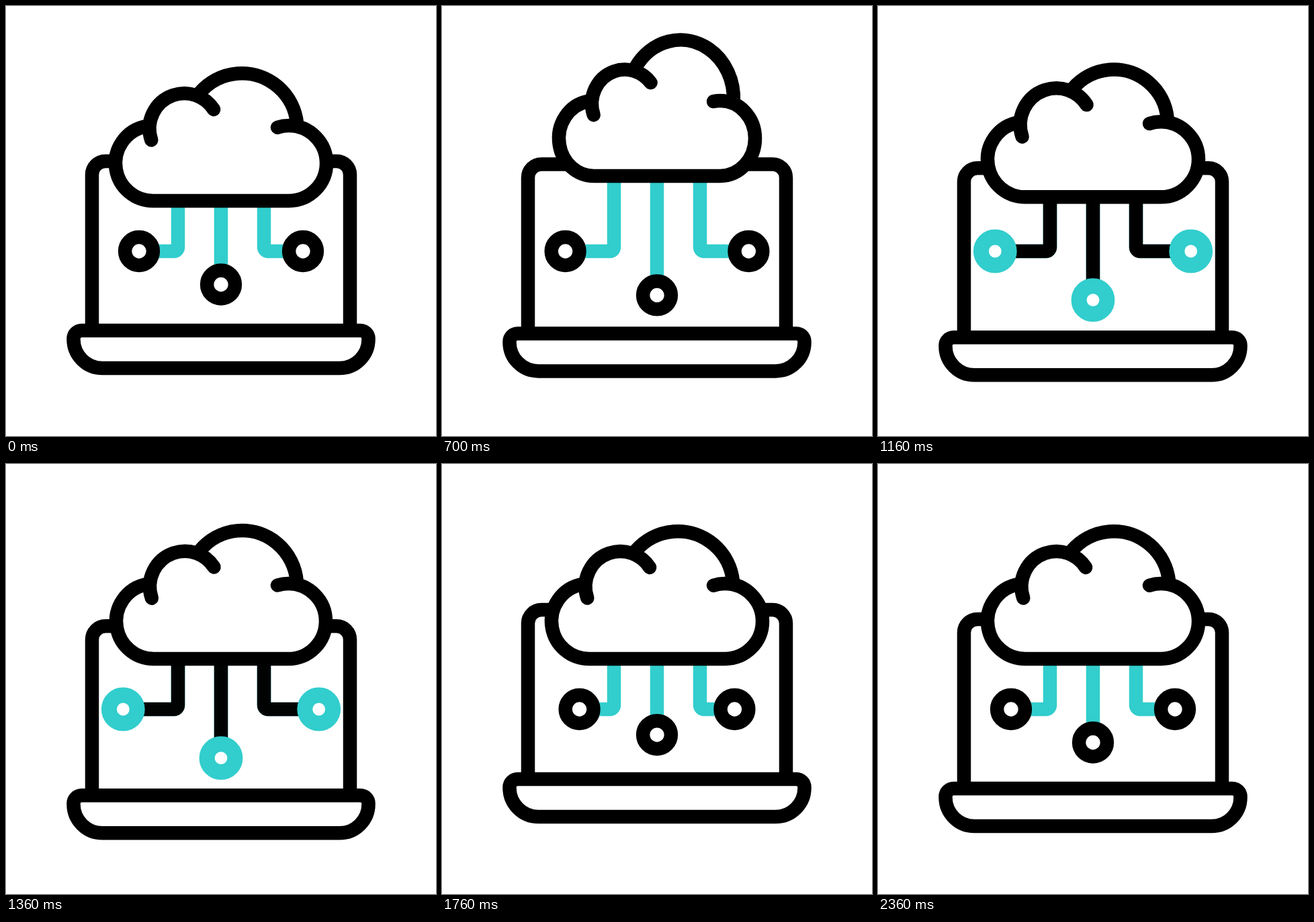
An HTML page with a canvas for the animation above (2.38 s loop, 640 px wide and 640 px high).

```html
<!DOCTYPE html>
<html lang="en">
<head>
<meta charset="utf-8">
<title>Cloud laptop</title>
<style>
  html, body { margin: 0; width: 100%; height: 100%; overflow: hidden; background: #fff; }
  canvas { display: block; width: 640px; height: 640px; }
</style>
</head>
<body>
<canvas id="stage" width="640" height="640"></canvas>
<script>
const ctx = document.getElementById('stage').getContext('2d');
const LOOP = 2380, LINE = 20.5, INK = '#000', TEAL = '#32cdcd';
const RAD = Math.PI / 180, TURN = 2 * Math.PI;

function ease(t, from, to) {
  const u = Math.min(1, Math.max(0, (t - from) / (to - from)));
  return u * u * (3 - 2 * u);
}

// Starts at a value, then eases to each [from, to, value] in turn.
const motion = (rest, ...moves) => t =>
  moves.reduce((v, [from, to, goal]) => v + (goal - v) * ease(t, from, to), rest);

// Wind up, swing out, hold, snap back past the rest position and settle.
const swing = (rest, windUp, out, rebound) => motion(rest,
  [0, 300, rest + windUp], [300, 930, rest + out],
  [1535, 1770, rest + rebound], [1770, 2170, rest]);

// Fades in, holds and fades out again.
const pulse = off => motion(0, [800, 1000, 1], [off - 150, off, 0]);

const laptopY = swing(0, -9.4, 10.3, -14);
const sideX = swing(198, 7.3, -23.7, 6.7);
const middleY = swing(414.5, -1, 23.2, -11.6);
const nodeGlow = pulse(1610);
const wireInk = pulse(1500);

const cloudY = motion(290, [170, 630, 253], [920, 1240, 290]);
const stretch = motion(0, [0, 320, -0.3], [380, 640, 1], [900, 1170, 0],
  [1240, 1540, 0.27], [1560, 1700, 0]);
const puff = motion(0, [0, 380, 1], [380, 640, 0], [900, 1160, 0.5], [1160, 1440, 0]);

function stroke(color, width = LINE, alpha = 1) {
  ctx.globalAlpha = alpha;
  ctx.strokeStyle = color;
  ctx.lineWidth = width;
  ctx.stroke();
  ctx.globalAlpha = 1;
}

function drawLaptop(y) {
  ctx.save();
  ctx.translate(0, y);
  ctx.beginPath();
  ctx.moveTo(128, 483);
  ctx.arcTo(128, 231, 320, 231, 20);
  ctx.arcTo(512, 231, 512, 483, 20);
  ctx.lineTo(512, 483);
  stroke(INK);
  ctx.beginPath();
  ctx.roundRect(100.5, 483, 439, 56, [12, 12, 43, 43]);
  stroke(INK);
  ctx.restore();
}

function drawWires(x, y, top, ink) {
  ctx.beginPath();
  for (const [from, to] of [[256, x + 25], [384, 615 - x]]) {
    ctx.moveTo(from, top);
    ctx.arcTo(from, 365, to, 365, 6);
    ctx.lineTo(to, 365);
  }
  ctx.moveTo(320, top);
  ctx.lineTo(320, y - 25);
  stroke(TEAL);
  stroke(INK, LINE, ink);
}

function drawNode(x, y, glow) {
  ctx.beginPath();
  ctx.arc(x, y, 20.9, 0, TURN);
  stroke(INK);
  stroke(TEAL, 23, glow);
}

// s makes the cloud tall and narrow; p trades size between the upper lobes.
function cloudLobes(s, p) {
  const spread = 101 - 7 * s, side = 56 - 4 * s;
  return {
    left: { x: 320 - spread, y: -56, rx: side, ry: 56 },
    right: { x: 320 + spread, y: -56, rx: side, ry: 56 },
    mid: {
      x: 265.5 + 6.5 * s, y: -107.5,
      rx: (52 - 3 * s) * (1 + 0.07 * p), ry: (52.5 - 1.5 * s) * (1 + 0.08 * p)
    },
    top: {
      x: 351 + 4 * s, y: -107 - 8.5 * s - 5 * p,
      rx: (82.5 - 3.5 * s) * (1 - 0.06 * p), ry: (82.8 + 4.2 * s) * (1 - 0.06 * p)
    }
  };
}

function arc(lobe, from, to, back = false) {
  ctx.ellipse(lobe.x, lobe.y, lobe.rx, lobe.ry, 0, from * RAD, to * RAD, back);
}

function drawCloud(y, s, p) {
  const { left, right, mid, top } = cloudLobes(s, p);
  ctx.save();
  ctx.translate(0, y);
  ctx.fillStyle = '#fff';
  for (const lobe of [left, right, mid, top]) {
    ctx.beginPath();
    arc(lobe, 0, 360);
    ctx.fill();
  }
  ctx.fillRect(left.x, -112, right.x - left.x, 112);

  ctx.beginPath();
  arc(top, 220.5 - 8.5 * s, 355 + 9 * s);
  stroke(INK);

  ctx.lineCap = 'round';
  ctx.beginPath();
  arc(mid, 161, 327 - 5 * s);
  stroke(INK);
  const tail = Math.acos((404 - right.x) / right.rx) / RAD;
  ctx.beginPath();
  arc(left, -100, 90, true);
  arc(right, 90, -tail, true);
  stroke(INK);
  ctx.restore();
}

function draw(t) {
  const x = sideX(t), y = middleY(t), base = cloudY(t), glow = nodeGlow(t);
  ctx.fillStyle = '#fff';
  ctx.fillRect(0, 0, 640, 640);
  drawLaptop(laptopY(t));
  drawWires(x, y, base, wireInk(t));
  drawNode(x, 365, glow);
  drawNode(640 - x, 365, glow);
  drawNode(320, y, glow);
  drawCloud(base, stretch(t), puff(t));
}

const start = performance.now();
function tick() {
  draw((performance.now() - start) % LOOP);
  requestAnimationFrame(tick);
}
tick();
</script>
</body>
</html>
```
